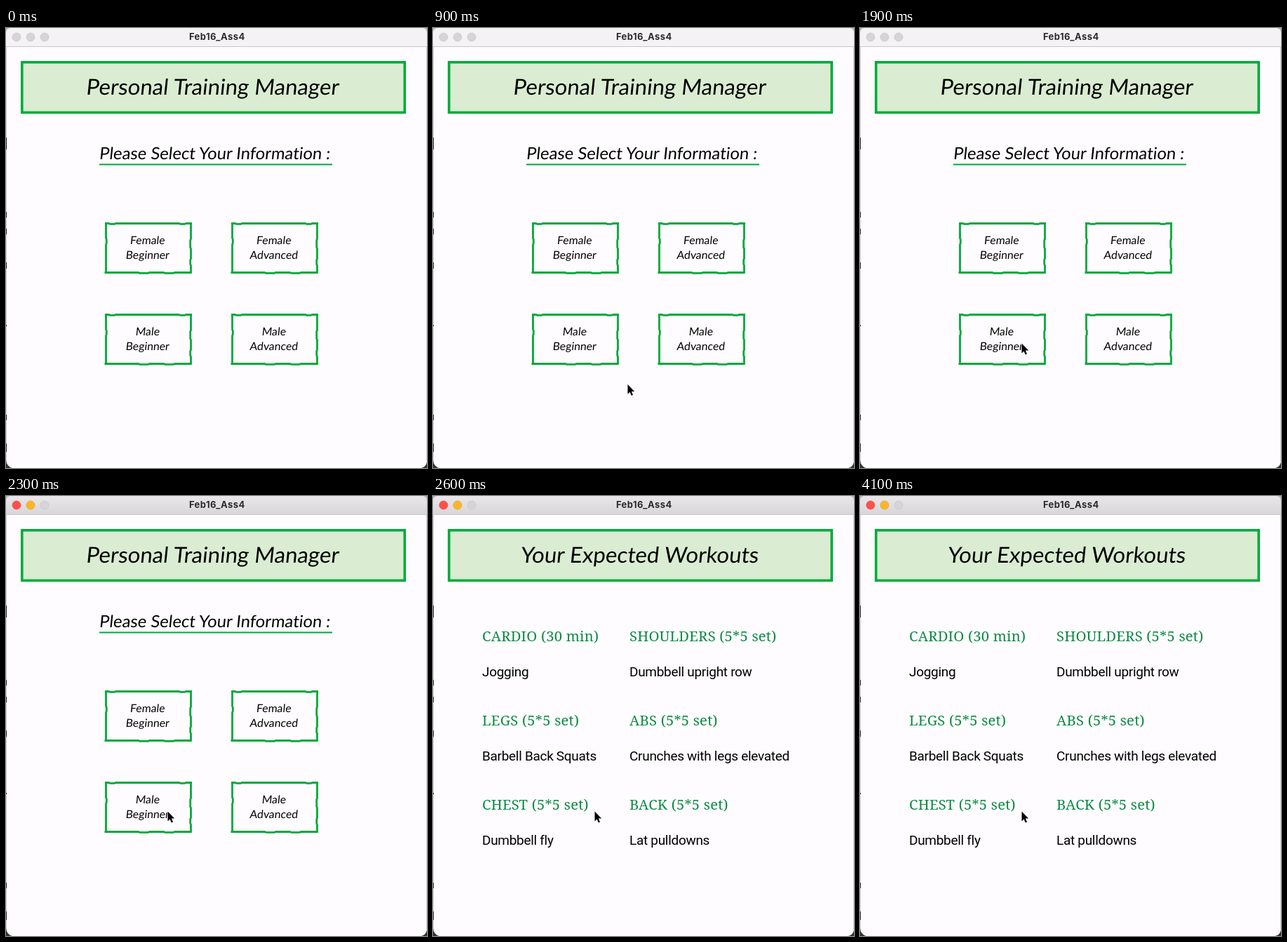
An HTML page for the animation above (4200 ms loop, 600 by 627 pixels).

```html
<!DOCTYPE html>
<html lang="en">
<head>
<meta charset="utf-8">
<title>Training Manager</title>
<style>
  html, body { margin: 0; width: 100%; height: 100%; overflow: hidden; background: #fefcfe; }
  svg { display: block; width: 600px; height: 627px; }
  .bar { fill: #f4f2f5; }
  .dot { fill: #d6d4d6; stroke: #c6c4c6; stroke-width: .7; }
  .caption { font: 700 13px Inter, sans-serif; letter-spacing: .45px; fill: #2b292b; }
  .active .bar { fill: url(#barShade); }
  .active .red { fill: #ff5149; stroke: #e2443c; }
  .active .yellow { fill: #fdb528; stroke: #e0a020; }
  .hand {
    font: 15.8px Lato, sans-serif; font-variant-ligatures: none; text-anchor: middle;
    transform: skewX(-6deg); transform-box: fill-box; transform-origin: center;
  }
  .big { font-size: 31.2px; }
  .mid { font-size: 23.8px; }
  .frame { fill: none; stroke: #00a83c; }
  .head { font: 300 20.3px "Noto Serif", serif; letter-spacing: .2px; fill: #0b8a43; }
  .item { font: 19px Roboto, sans-serif; letter-spacing: -.3px; }
</style>
</head>
<body>
<svg id="stage" viewBox="0 0 600 627">
  <defs>
    <linearGradient id="barShade" x2="0" y2="1">
      <stop stop-color="#e9e7ea"/><stop offset="1" stop-color="#d8d6d9"/>
    </linearGradient>
    <path id="sketch" d="M-1.500 0H4L6 .8H12L14 0H104L106 .8H112L114 0H122.500M121 -1V22L120.200 24V34L121 36V50L120.200 52V58L121 60V71M122 70H98L96 70.800H84L82 70H62L60 70.800H48L46 70H-2M0 71V30L.8 28V23L0 21V-1"/>
  </defs>
  <rect width="600" height="627" fill="#fefcfe"/>
  <path class="bar" d="M0 0H600V26H0Z"/>
  <path d="M0 26.500H600" stroke="#c9c7ca"/>
  <path d="M.5 27V627M599.500 27V618" stroke="#cfcdd0"/>
  <path d="M.5 156v17m0 89v8m0 16v8m0 40v9m0 80v2m0 126v8m0 33v12" stroke="#222"/>
  <path d="M0 616Q1 625 9 627H0ZM600 618Q599 625 592 627H600Z" fill="#333"/>
  <path d="M0 0H6Q1 1 0 6ZM600 0H594Q599 1 600 6Z" fill="#bbb9bc"/>
  <circle class="dot red" cx="15" cy="13" r="6"/>
  <circle class="dot yellow" cx="35" cy="13" r="6"/>
  <circle class="dot" cx="55" cy="13" r="6"/>
  <text class="caption" x="300.800" y="17" text-anchor="middle">Feb16_Ass4</text>
  <rect x="22.800" y="48.800" width="545.400" height="71.600" fill="#daecd1" stroke="#00ac3d" stroke-width="3.600"/>

  <g id="menu">
    <text class="hand big" x="295" y="95">Personal Training Manager</text>
    <text class="hand mid" x="298" y="187">Please Select Your Information :</text>
    <path class="frame" d="M133 194.500H465" stroke-width="2"/>
  </g>
  <g id="plan">
    <text class="hand big" x="295" y="95">Your Expected Workouts</text>
  </g>
  <path id="cursor" d="M0 0V14L3.100 11L5.200 16L7.500 15L5.400 10.100H9.700Z"
        stroke="#fff" stroke-width="1.500" paint-order="stroke"/>
</svg>
<script>
const LOOP = 4200, APPEAR = 700, ARRIVE = 1200, ACTIVATE = 2300, OPEN = 2600;
const [stage, menu, plan, cursor] =
  ["stage", "menu", "plan", "cursor"].map(id => document.getElementById(id));

function add(parent, tag, attrs, text = "") {
  const node = document.createElementNS("http://www.w3.org/2000/svg", tag);
  for (const key in attrs) node.setAttribute(key, attrs[key]);
  node.textContent = text;
  parent.append(node);
}

["Female", "Male"].forEach((group, row) => ["Beginner", "Advanced"].forEach((level, col) => {
  const x = 142 + col * 180, y = 278 + row * 130;
  add(menu, "use", { href: "#sketch", x: x + .5, y: y + .5, class: "frame", "stroke-width": 2.8 });
  add(menu, "text", { x: x + 60, y: y + 30, class: "hand" }, group);
  add(menu, "text", { x: x + 60, y: y + 51, class: "hand" }, level);
}));

[
  ["CARDIO (30 min)", "Jogging"],
  ["SHOULDERS (5*5 set)", "Dumbbell upright row"],
  ["LEGS (5*5 set)", "Barbell Back Squats"],
  ["ABS (5*5 set)", "Crunches with legs elevated"],
  ["CHEST (5*5 set)", "Dumbbell fly"],
  ["BACK (5*5 set)", "Lat pulldowns"],
].forEach(([title, exercise], i) => {
  const x = 70 + i % 2 * 210, y = 207 + (i >> 1) * 120;
  add(plan, "text", { x, y, class: "head" }, title);
  add(plan, "text", { x, y: y + 50, class: "item" }, exercise);
});

const show = (node, visible) => { node.style.display = visible ? "" : "none"; };

function draw(now) {
  const t = now % LOOP;
  // The pointer advances in 100 ms steps and slows towards the button.
  const step = Math.floor(t / 100) * 100;
  const p = Math.min(1, Math.max(0, (step - APPEAR) / (ARRIVE - APPEAR)));
  const eased = 1 - (1 - p) ** 2;
  cursor.setAttribute("transform", `translate(${361 - 130.500 * eased} ${611.5 - 162 * eased})`);
  show(cursor, t >= APPEAR);
  show(menu, t < OPEN);
  show(plan, t >= OPEN);
  stage.classList.toggle("active", t >= ACTIVATE);
  requestAnimationFrame(draw);
}
draw(0);
</script>
</body>
</html>
```
